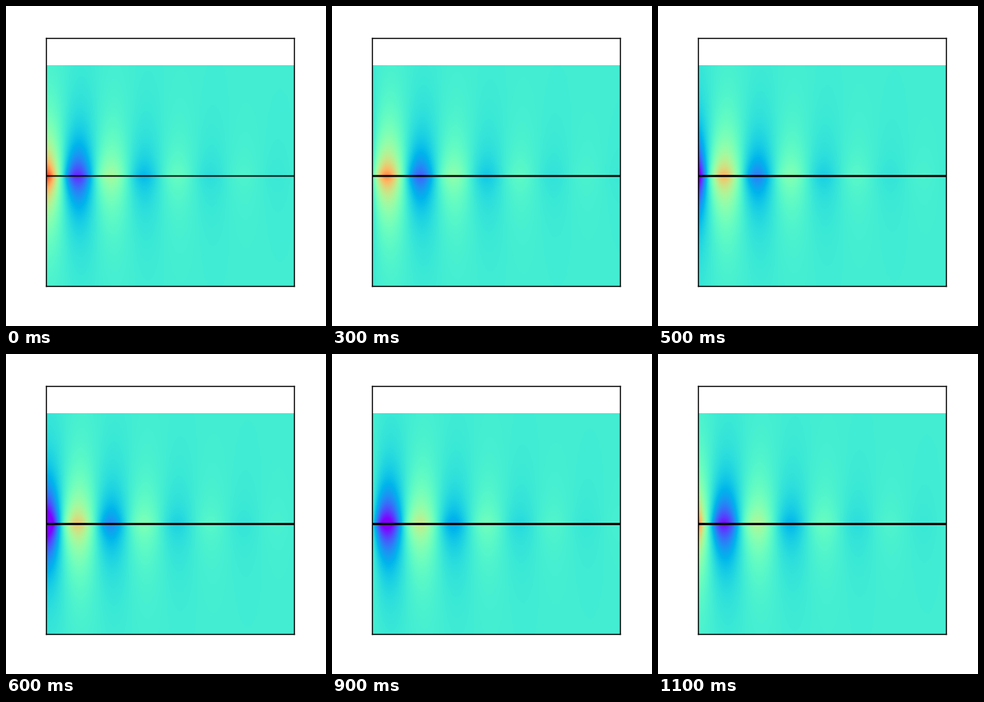
Animation of 400 by 400 pixels, one loop 1200 ms. Source, as a matplotlib script:

```python
import numpy as np
import matplotlib.pyplot as plt
from matplotlib.animation import FuncAnimation

FRAMES, INTERVAL = 12, 100
WIDTH, HALF = 310, 138           # field size in pixels
WAVELENGTH, DECAY, DEPTH = 83, 80, 42
OFFSET, AMPLITUDE = 0.38, 0.565  # in colour map units
TILT = 0.04                      # outward drift of the crests

x = np.arange(WIDTH) + 0.5
y = np.abs(np.arange(-HALF, HALF) + 0.5)[:, None]
envelope = AMPLITUDE * np.exp(-x / DECAY - y / DEPTH)
phase = 2 * np.pi * (x - TILT * y) / WAVELENGTH


def field(i):
    return OFFSET + envelope * np.cos(phase - 2 * np.pi * i / FRAMES)


fig = plt.figure(figsize=(4, 4), dpi=100, facecolor="white")
ax = fig.add_axes([0.125, 0.125, 0.775, 0.775])
image = ax.imshow(field(0), cmap="rainbow", vmin=0, vmax=1, origin="lower",
                  extent=(0, WIDTH, -HALF, HALF), aspect="auto",
                  interpolation="nearest")
# Stacked antialiased lines: the interface grows heavier with each step.
layers = [ax.plot([0, WIDTH], [0, 0], color="k", lw=1)[0]
          for _ in range(FRAMES + 1)]
ax.set(xlim=(0, WIDTH), ylim=(-HALF, WIDTH - HALF), xticks=[], yticks=[])
for spine in ax.spines.values():
    spine.set_linewidth(1)


def update(i):
    image.set_data(field(i))
    for n, line in enumerate(layers):
        line.set_visible(n < i + 2)
    return [image, *layers]


anim = FuncAnimation(fig, update, frames=FRAMES, interval=INTERVAL,
                     repeat=True, repeat_delay=0, blit=False)
plt.show()
```
